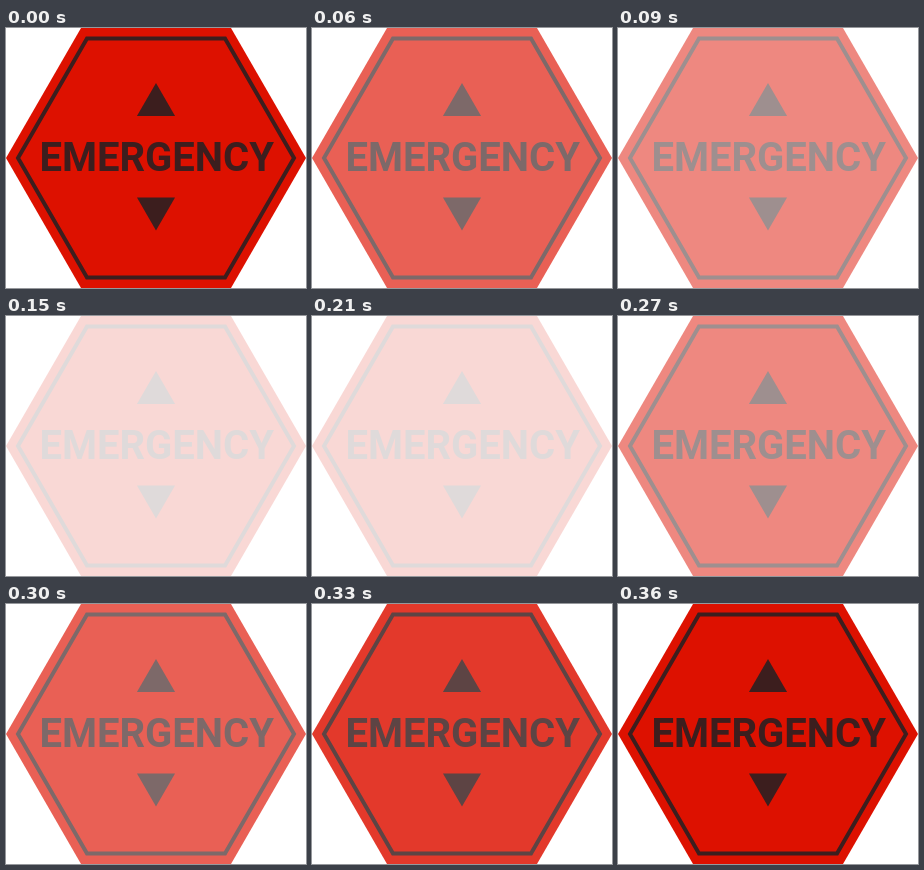
These frames come from a looping animation (300x260 px, 0.42 s). An HTML page with a canvas:

```html
<!DOCTYPE html>
<html lang="en">
<head>
<meta charset="utf-8">
<title>Emergency sign</title>
<style>
  html, body { margin: 0; width: 100%; height: 100%; overflow: hidden; background: #fff; }
  canvas { display: block; }
</style>
</head>
<body>
<canvas id="stage" width="300" height="260"></canvas>
<script>
const RED = '#dd1100';
const DARK = '#3c1e1e';
const CX = 150, CY = 130;
const STEP = 30, LOOP = 420, HALF = 6;

const ctx = document.getElementById('stage').getContext('2d');

function polygon(sides, cx, cy, radius, startAngle) {
  ctx.beginPath();
  for (let i = 0; i < sides; i++) {
    const a = startAngle + i * 2 * Math.PI / sides;
    ctx.lineTo(cx + radius * Math.cos(a), cy + radius * Math.sin(a));
  }
  ctx.closePath();
}

// Equilateral arrow; dir is -1 for up, 1 for down.
function arrow(tipY, dir) {
  const radius = 22;
  polygon(3, CX, tipY - dir * radius, radius, dir * Math.PI / 2);
  ctx.fill();
}

function drawSign(sign) {
  sign.fillStyle = RED;
  polygon(6, CX, CY, 150, 0);
  sign.fill();

  sign.strokeStyle = sign.fillStyle = DARK;
  sign.lineWidth = 4;
  polygon(6, CX, CY, 138, 0);
  sign.stroke();

  arrow(55, -1);
  arrow(202.5, 1);

  sign.font = '700 40px Roboto, sans-serif';
  sign.textAlign = 'center';
  sign.fillText('EMERGENCY', 150.7, 143);
}

// Fades out and back in by sixths, then holds at full strength.
function opacityAt(time) {
  const step = Math.min(Math.floor((time % LOOP) / STEP), 2 * HALF);
  return Math.abs(HALF - step) / HALF;
}

let start;
function frame(now) {
  start ??= now;
  ctx.globalAlpha = 1;
  ctx.fillStyle = '#fff';
  ctx.fillRect(0, 0, 300, 260);
  drawSign(ctx);

  // A white veil fades the whole sign evenly.
  ctx.globalAlpha = 1 - opacityAt(now - start);
  ctx.fillStyle = '#fff';
  ctx.fillRect(0, 0, 300, 260);
  requestAnimationFrame(frame);
}
requestAnimationFrame(frame);
</script>
</body>
</html>
```
